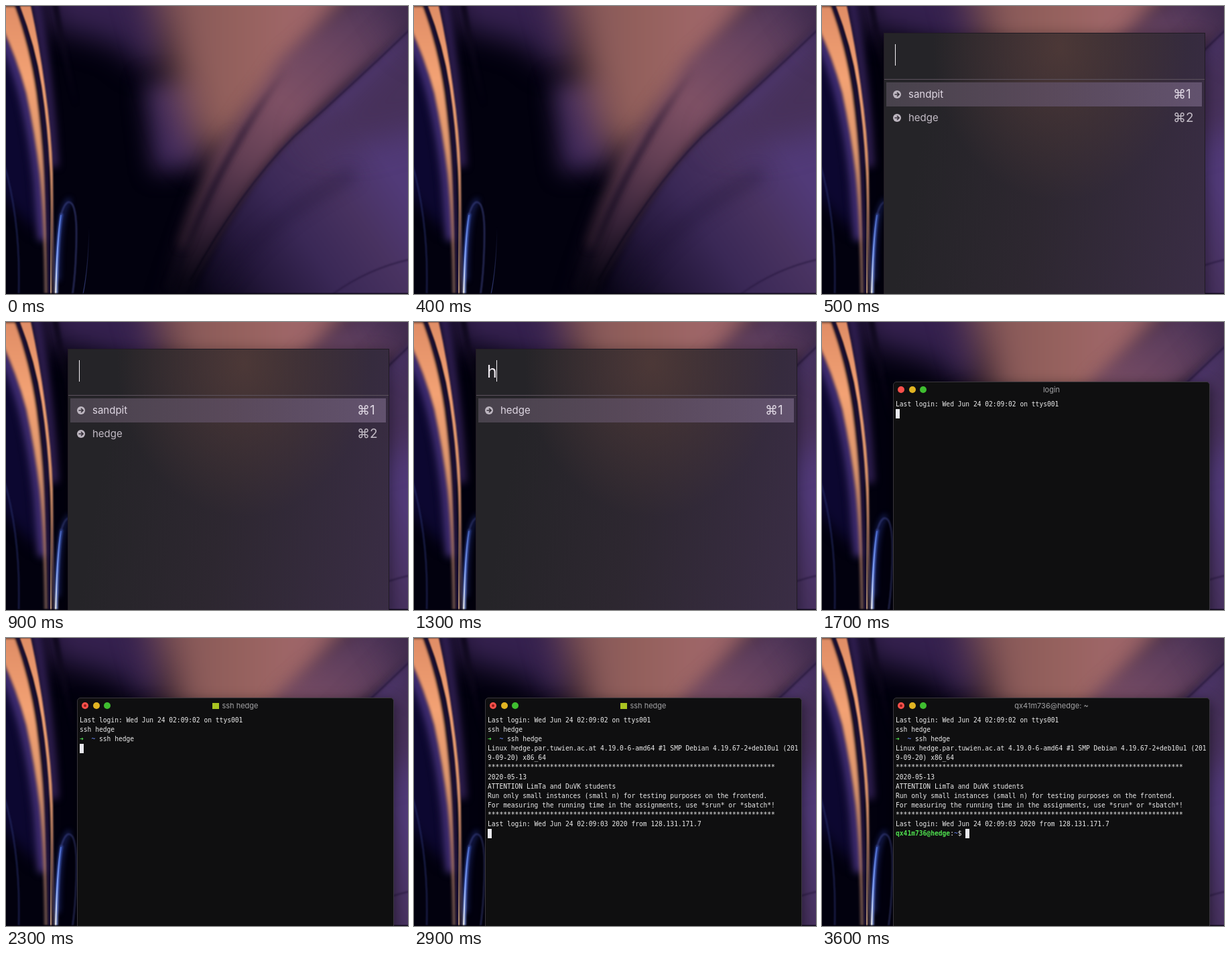
An HTML page with a canvas that plays this animation: 600x430 px, repeating every 3700 ms.

```html
<!DOCTYPE html>
<html lang="en">
<head>
<meta charset="utf-8">
<style>
html, body { margin: 0; width: 100%; height: 100%; overflow: hidden; background: #02010e; }
canvas { position: absolute; left: 0; top: 0; }
.win { position: absolute; box-sizing: border-box; overflow: hidden; font-family: Inter, sans-serif; }
.win * { position: absolute; white-space: pre; }
[hidden] { display: none !important; }

#launcher {
  left: 92px; top: 40px; width: 480px; height: 400px; color: #c3bcc6;
  border: 1px solid #211b24;
  background:
    radial-gradient(ellipse 190px 230px at 262px 20px, #4c3837, #4c383700),
    linear-gradient(100deg, #252428 15%, #2d2730 50%, #3a2d45);
  box-shadow: 0 6px 22px #0007;
}
#query { left: 16px; top: 17px; font-size: 25px; line-height: 32px; color: #f2edf3; }
#caret { top: 16px; width: 1px; height: 32px; background: #f4f0f5; }
.rule { left: 0; right: 0; top: 68px; height: 1px; background: #5c525d; }
.pick { left: 3px; top: 73px; width: 471px; height: 36px; background: linear-gradient(90deg, #48424c, #59495a 50%, #62526e); }
.row { left: 0; width: 478px; height: 36px; line-height: 35px; }
.row svg { left: 13px; top: 12px; }
.row span { left: 36px; top: 0; font-size: 15px; }
.row b { left: 431px; top: 0; font-size: 19px; font-weight: 400; }
.row.on { color: #ded6e2; }

#term {
  left: 106px; top: 89px; width: 473px; height: 350px; color: #ececec;
  background: #0f0f10; border: 1px solid #39363c; border-radius: 5px 5px 0 0;
  box-shadow: 0 6px 20px #0008;
}
.light { top: 6px; width: 10px; height: 10px; border-radius: 50%; }
#busy { left: 3px; top: 3px; width: 4px; height: 4px; border-radius: 50%; background: #8c1d1a; }
#title { left: 0; right: 0; top: 3px; text-align: center; font-size: 11px; line-height: 17px; color: #a3a3a5; }
#title * { position: static; }
#title i { display: inline-block; width: 10px; height: 9px; margin-right: 4px; background: #a9c421; vertical-align: -1px; }
#out { left: 3px; top: 25.6px; font: 9.65px/14.15px "DejaVu Sans Mono", monospace; }
#out * { position: static; }
#out .block { display: inline-block; width: 6px; height: 14px; background: #e9e9ee; vertical-align: top; }
.green { color: #4fe04f; }
.blue { color: #6b8cff; }
</style>
</head>
<body>
<canvas id="wall" width="600" height="430"></canvas>

<div id="launcher" class="win" hidden>
  <span id="query"></span><div id="caret"></div>
  <div class="rule"></div><div class="pick"></div>
  <div id="rows" style="left:0;top:0"></div>
</div>

<div id="term" class="win" hidden>
  <div class="light" style="left:6px;background:#fb504b"><div id="busy"></div></div>
  <div class="light" style="left:23px;background:#e1b422"></div>
  <div class="light" style="left:39px;background:#3fbe30"></div>
  <div id="title"></div>
  <div id="out"></div>
</div>

<script>
const $ = id => document.getElementById(id);
const ctx = $('wall').getContext('2d');

// Blurred shape: filled, or stroked when a width is given.
function soft(path, color, blur, width) {
  ctx.filter = blur ? `blur(${blur}px)` : 'none';
  ctx.fillStyle = ctx.strokeStyle = color;
  ctx.lineWidth = width || 1;
  ctx[width ? 'stroke' : 'fill'](new Path2D(path));
}

function fade(x0, y0, x1, y1, ...stops) {
  const g = ctx.createLinearGradient(x0, y0, x1, y1);
  stops.forEach((c, i) => g.addColorStop(i / (stops.length - 1), c));
  return g;
}

function paintWall() {
  soft('M0 0H600V430H0Z', '#02010e', 0);

  // Warm glow and the purple around it
  soft('M55 -60H270L235 90Q200 100 170 60Q120 45 60 30Z', '#34204e', 22);
  soft('M206 115L310 110L290 235L222 250Z', '#40295c', 17);
  soft('M215 -80H570L430 130L335 225Q285 235 265 165Q245 90 200 -80Z',
    fade(215, 0, 560, 0, '#7c5157', '#93605b', '#a1676a', '#8c5b6b'), 28);

  // Folds of the right-hand sheet
  soft('M540 -30H640V20Q520 105 430 195Q340 295 270 450H228Q268 320 312 220L410 80Z',
    fade(560, 0, 260, 410, '#503659', '#6c4661', '#7f5165', '#633f54', '#39243a', '#080512'), 12);
  soft('M660 -15L598 38Q520 115 430 195Q350 275 275 440H660Z',
    fade(300, 430, 570, 240, '#0a0618', '#25183c', '#3a2856', '#483260', '#513a78'), 4);
  soft('M440 200L620 20L690 60L650 175L520 210Z', '#432e4eb0', 24);
  soft('M540 -60H680V90L600 50Z', '#35234599', 26);
  soft('M310 430Q380 320 520 250', '#1a103048', 11, 22);
  soft('M425 85Q345 190 290 310Q262 370 243 420',
    fade(420, 90, 250, 420, '#28183400', '#281834b0', '#190f24', '#080512'), 4, 10);
  soft('M340 190Q290 270 262 360', '#7c505a44', 8, 12);
  soft('M604 34Q520 115 430 195Q350 275 275 410',
    fade(600, 30, 275, 410, '#24163acc', '#24163acc', '#1c1130cc', '#05030e'), 0.8, 2.2);
  soft('M488 430Q540 392 604 378', '#2a1a42cc', 0.8, 1.8);

  // Two bright strands on the left, with a purple fringe
  soft('M-20 0L20 90L42 230L50 340L-30 260Z', '#0c0730', 10);
  soft('M-14 30Q14 80 28 140Q42 200 48 260L55 350', '#4b3583', 6, 13);
  soft('M42 -20Q58 70 68 180L72 240', '#37235c', 6, 12);
  soft('M72 -10Q88 80 106 155', fade(75, 0, 105, 150, '#10091f', '#0a061600'), 2, 9);
  const glow = fade(0, 0, 0, 430, '#e08d66', '#f3a274', '#dd966c', '#ad7660', '#8c6a60');
  soft('M-12 0H14Q36 60 46 130Q54 190 57 250Q61 330 62 430H58Q57 320 50 250Q43 190 30 130Q14 70 -12 20Z', glow, 2.2);
  soft('M20 0H37Q50 60 58 120Q68 190 70 250L72 430H69Q68 300 65 240Q62 180 53 120Q44 60 20 0Z', glow, 1.2);
  soft('M16 -5Q40 60 50 125Q58 180 61 240L65 430', '#1c1038', 1.4, 4);
  soft('M67 260V430', fade(0, 260, 0, 430, '#f0b07000', '#f4c79a'), 0.5, 1.4);
  soft('M70.5 290V430', fade(0, 290, 0, 430, '#10102c00', '#10102c'), 0.5, 2);

  // Thin blue threads
  soft('M-3 235Q22 320 19 430', '#2a3270', 0.8, 1.4);
  soft('M77 410Q78 300 96 289', '#2b3c9ab0', 4, 6);
  soft('M75 435Q76 350 83 310', fade(0, 310, 0, 430, '#3450b0', '#5878e0', '#90a8f0'), 1.5, 4);
  soft('M74 435Q76 350 82 312', fade(0, 310, 0, 430, '#4a68c8', '#7f9ff4', '#f0eee8'), 0.7, 2);
  soft('M82 312Q90 285 99 296Q106 308 105 350Q104 400 99 432', '#3f4688', 0.8, 1.5);
  soft('M124 330Q123 390 115 430', fade(0, 330, 0, 430, '#2c336000', '#333c78'), 0.6, 1.2);
  soft('M0 428.5H600V430H0Z', '#05030ecc', 0);
}

const HOST = 'hedge', USER = 'qx41m736@' + HOST;
const row = (name, i) => `<div class="row ${i ? '' : 'on'}" style="top:${73 + 35 * i}px">
  <svg width="12" height="12"><circle cx="6" cy="6" r="6" fill="#bdb6c0"/>
  <path d="M2.5 6H8M6 3L9 6L6 9" fill="none" stroke="#39333c" stroke-width="1.7"/></svg>
  <span>${name}</span><b>⌘${i + 1}</b></div>`;

const stars = '*'.repeat(74);
const command = 'ssh ' + HOST;
const login = 'Last login: Wed Jun 24 02:09:02 on ttys001\n';
const typed = login + command + '\n';
const sent = typed + `<span class="green">➜</span>  <span class="blue">~</span> ${command}\n`;
const welcome = sent + `Linux ${HOST}.par.tuwien.ac.at 4.19.0-6-amd64 #1 SMP Debian 4.19.67-2+deb10u1 (201
9-09-20) x86_64
${stars}
2020-05-13
ATTENTION LimTa and DuVK students
Run only small instances (small n) for testing purposes on the frontend.
For measuring the running time in the assignments, use *srun* or *sbatch*!
${stars}
Last login: Wed Jun 24 02:09:03 2020 from 128.131.171.7
`;
const prompt = welcome + `<b class="green">${USER}</b>:<span class="blue">~</span>$ `;
const sshTitle = '<i></i>' + command;

const scenes = [
  { at: 0 },
  { at: 500, query: '', rows: ['sandpit', HOST] },
  { at: 1300, query: 'h', rows: [HOST] },
  { at: 1400 },
  { at: 1700, title: 'login', out: login },
  { at: 1900, title: 'login', out: typed },
  { at: 2200, title: sshTitle, out: sent, busy: true },
  { at: 2900, title: sshTitle, out: welcome, busy: true },
  { at: 3500, title: USER + ': ~', out: prompt, busy: true },
];

function show(s) {
  $('launcher').hidden = !s.rows;
  $('term').hidden = !s.out;
  if (s.rows) {
    $('query').textContent = s.query;
    $('caret').style.left = (s.query ? 30 : 16) + 'px';
    $('rows').innerHTML = s.rows.map(row).join('');
  }
  if (s.out) {
    $('title').innerHTML = s.title;
    $('out').innerHTML = s.out + '<span class="block"></span>';
    $('busy').hidden = !s.busy;
  }
}

let current;
const start = performance.now();
function tick() {
  const t = (performance.now() - start) % 3700;
  const scene = scenes.filter(s => s.at <= t).pop();
  if (scene !== current) show(current = scene);
  requestAnimationFrame(tick);
}
paintWall();
tick();
</script>
</body>
</html>
```
